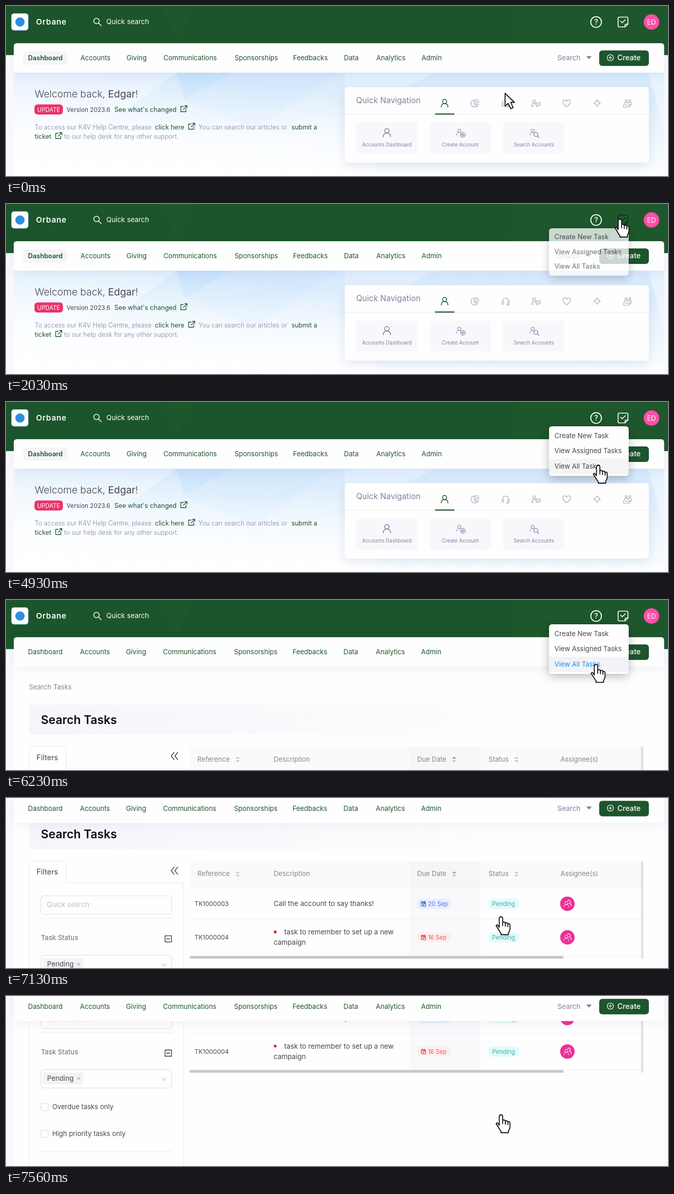
These frames come from a looping animation (1280 px wide and 329 px high, 8000 ms). An HTML page:

```html
<!DOCTYPE html>
<html lang="en">
<head>
<meta charset="utf-8">
<title>Tasks menu</title>
<style>
html, body { margin: 0; height: 100%; overflow: hidden; background: #f8f8fd; }
svg { display: block; width: 100vw; height: 100vh; }
text { font-family: Inter, "Open Sans", sans-serif; font-size: 13px; white-space: pre; }
.line { fill: none; stroke-linecap: round; stroke-linejoin: round; }
.green { fill: #1d552d; }
.grey { fill: #83829f; }
.ash { fill: #85858e; }
.dark { fill: #464650; }
.light { font-weight: 300; }
.mid { text-anchor: middle; }
.help text { font-size: 12.4px; }
.card { filter: drop-shadow(0 6px 10px #4a6aa028); }
.bar { filter: drop-shadow(0 5px 9px #5a5aa014); }
.pop { filter: drop-shadow(0 5px 9px #0004); }
.pill { font-size: 11.6px; font-weight: 300; }
</style>
</head>
<body>
<svg viewBox="0 0 1280 329" preserveAspectRatio="none">
<defs>
  <linearGradient id="sky" x1="0" y1="0" x2="0" y2="1">
    <stop offset="0" stop-color="#d3e8fc"/><stop offset=".45" stop-color="#e6f2fd"/><stop offset="1" stop-color="#fdfeff"/>
  </linearGradient>
  <linearGradient id="haze" x1="0" y1="1" x2=".3" y2="0">
    <stop offset="0" stop-color="#fff"/><stop offset=".4" stop-color="#fff" stop-opacity=".75"/><stop offset="1" stop-color="#fff" stop-opacity="0"/>
  </linearGradient>
  <linearGradient id="band"><stop offset="0" stop-color="#f6f5fb"/><stop offset="1" stop-color="#fefefe"/></linearGradient>
  <linearGradient id="edge"><stop offset="0" stop-color="#000" stop-opacity="0"/><stop offset="1" stop-color="#000" stop-opacity=".16"/></linearGradient>
  <g id="person"><circle cy="-3.2" r="4"/><path d="M-6.5 7.5C-6.5 3-4 .8 0 .8S6.5 3 6.5 7.5"/></g>
  <g id="pie"><path d="M-1.5-6.5a7 7 0 1 0 7.500 8h-7.500zM1.500-7.500a6.500 6.500 0 0 1 6 6h-6zM-1.500 1.500L4 6"/></g>
  <g id="headset"><path d="M-6 1v-1a6 6 0 0 1 12 0v1M-7 1h3v5h-3zM4 1h3v5h-3zM6 6q0 2-5 2"/></g>
  <g id="talk"><circle cx="-4" cy="-4" r="2.500"/><path d="M-8 7v-4q0-3 4-3 3 0 4 3M-6 7v-3M0-1h8v6h-4l-2 2v-2h-2zM2 2h4"/></g>
  <g id="heart"><path d="M0 7C-10 0-8.500-6.500-4-6.500Q-1-6.500 0-3.500 1-6.500 4-6.500C8.500-6.500 10 0 0 7z"/></g>
  <g id="aim"><circle r="4.500"/><path d="M0-7v4M0 7v-4M-7 0h4M7 0h-4"/></g>
  <g id="care"><circle cx="-3" cy="-5" r="2"/><circle cx="4" cy="-5" r="2"/><path d="M-6 1q0-3 3-3t3 3q0-3 4-3 3 0 3 3M-8 3h3q2 0 3 1.500h3l5-2.500q2 0 0 2L2 8h-10z"/></g>
  <g id="out"><path d="M-1-4.500h-5v10h10v-5M1.500-6h4.500v4.500M6-6L-1 1"/></g>
  <g id="plus"><circle r="6"/><path d="M-3 0h6M0-3v6"/></g>
  <g id="sort"><path d="M-4-1.500l4-4 4 4z"/><path d="M-4 1.500l4 4 4-4z" fill="#c8c8cc"/></g>
  <g id="date"><path d="M-4 4v-7.500h8v3M-4-1.500h8M-2-5v2M2-5v2M-4 4h3"/><circle cx="2" cy="2.500" r="2.500"/></g>
</defs>

<rect width="1280" height="329" fill="#f8f8fd"/>
<rect x="15" width="1257.500" height="329" fill="#fefefe"/>

<g id="home">
  <rect x="15" y="120" width="1257.500" height="209" fill="url(#sky)"/>
  <path d="M15 129H330L235 200 15 290z" fill="#fff" opacity=".3"/>
  <path d="M330 129h105l-90 52z" fill="#b5dafa" opacity=".42"/>
  <path d="M435 129L345 181 480 240 640 129z" fill="#c8e2fb" opacity=".3"/>
  <path d="M830 129l-175 90V129z" fill="#fff" opacity=".25"/>
  <path d="M1272 129v110l-30-110z" fill="#fff" opacity=".35"/>
  <rect x="15" y="129" width="700" height="200" fill="url(#haze)"/>
  <text x="55.500" y="176.500" class="light dark" style="font-size:19.100px">Welcome back, <tspan font-weight="400">Edgar</tspan>!</text>
  <rect x="55" y="190.500" width="55" height="19.500" rx="6" fill="#ea3369"/>
  <text x="82.500" y="204.500" class="mid" fill="#fff" style="font-size:11.200px">UPDATE</text>
  <text x="117" y="204.500" class="dark" style="font-size:11.800px">Version 2023.6</text>
  <text x="209.500" y="204.500" class="green" style="font-size:12.500px">See what's changed</text>
  <g class="help light">
    <text x="55.500" y="238.500" class="grey">To access our K4V Help Centre, please</text>
    <text x="288" y="238.500" class="green" font-weight="400">click here</text>
    <text x="365" y="238.500" class="grey">. You can search our articles or</text>
    <text x="552" y="238.500" class="green" font-weight="400">submit a</text>
    <text x="55.500" y="257" class="green" font-weight="400">ticket</text>
    <text x="112.500" y="257" class="grey">to our help desk for any other support.</text>
  </g>
  <g class="line" stroke="#1d552d" stroke-width="1.300">
    <use href="#out" x="344" y="199"/><use href="#out" x="359" y="233"/><use href="#out" x="102" y="251"/>
  </g>
  <rect x="655" y="157" width="588" height="146" rx="6" fill="#fefefe" class="card"/>
  <path d="M655 209.500h588" stroke="#efeff4"/>
  <text x="677" y="188" class="grey" style="font-size:15.500px">Quick Navigation</text>
  <rect x="829.500" y="208" width="37.500" height="2.200" fill="#1d552d"/>
  <g id="icons" class="line" stroke="#a9a8c0" stroke-width="1.200"></g>
  <g id="tiles"></g>
</g>

<g id="tasks">
  <text x="44.500" y="172.500" class="grey">Search Tasks</text>
  <rect x="44" y="202.500" width="1000" height="58" rx="6" fill="url(#band)"/>
  <text x="67.500" y="239.500" fill="#0c0c0c" font-weight="600" style="font-size:22.700px">Search Tasks</text>
  <g class="line" stroke="#e8e8ef">
    <path d="M44.500 680V289q0-5.500 5.500-5.500h60.500q5.500 0 5.500 5.500v36.500h222q5.500 0 5.500 5.500v350"/>
    <path d="M67 394.500h254M67 623.500h254"/>
    <rect x="67.500" y="350.500" width="253" height="36" rx="6" stroke="#dcdce0"/>
    <rect x="67.500" y="465.500" width="253" height="36" rx="6" stroke="#dcdce0"/>
    <rect x="67.500" y="531.500" width="14" height="14" rx="1.500" stroke="#dcdce0"/>
    <rect x="67.500" y="583" width="14" height="14" rx="1.500" stroke="#dcdce0"/>
    <path d="M301 482l4 5 4-5" stroke="#aaa"/>
    <path d="M325 295l-5.500 7 5.500 7M332 295l-5.500 7 5.500 7" stroke="#333" stroke-width="1.400"/>
    <path d="M307.500 428h12.500v12h-12.500zM310.500 434h6.500" stroke="#333" stroke-width="1.300"/>
  </g>
  <text x="59" y="309.500" class="dark" style="font-size:14.400px">Filters</text>
  <text x="78.500" y="372.500" fill="#c0c0c4" style="font-size:13.300px">Quick search</text>
  <text x="67.500" y="436.500" fill="#7b7b90" font-weight="500">Task Status</text>
  <rect x="71" y="471.500" width="78.500" height="23" rx="2" fill="#f3f3f4"/>
  <text x="79.500" y="487.500" class="dark" style="font-size:13.300px">Pending</text>
  <path d="M137.500 480.500l5.500 5.500m0-5.500l-5.500 5.500" stroke="#888"/>
  <text x="89.500" y="542.500" class="dark">Overdue tasks only</text>
  <text x="89.500" y="594.500" class="dark">High priority tasks only</text>

  <rect x="355" y="283.500" width="877" height="50.500" fill="#fafafb"/>
  <rect x="780" y="283.500" width="138" height="50.500" fill="#f6f6f7"/>
  <rect x="780" y="334" width="138" height="133" fill="#f9f9fb"/>
  <path d="M355 333.500h877M355 395.500h877M355 466.500h877" stroke="#f0f0f3"/>
  <g id="heads"></g>
  <g fill="#c8c8cc">
    <use href="#sort" x="448" y="308.500"/><use href="#sort" x="987" y="308.500"/>
    <use href="#sort" x="866.500" y="308.500" fill="#5aa9f0"/>
  </g>
  <g id="rows"></g>
  <text x="517.500" y="370" class="dark" style="font-size:13.400px">Call the account to say thanks!</text>
  <circle cx="520.500" cy="420.500" r="2.800" fill="#f5222d"/>
  <text x="538" y="425.500" class="dark" style="font-size:13.400px">task to remember to set up a new</text>
  <text x="517.500" y="445.500" class="dark" style="font-size:13.400px">campaign</text>
  <rect x="355" y="467" width="723" height="5" rx="2.500" fill="#c6c6c8"/>
  <rect x="1226" y="283.500" width="6" height="188.500" fill="url(#edge)"/>
</g>

<g id="head">
  <rect width="1280" height="95" fill="#1c552b"/>
  <path d="M300 0h65l-35 65z" fill="#fff" opacity=".01"/>
  <path d="M980 0l-6 95h306V0z" fill="#fff" opacity=".01"/>
  <rect x="10.500" y="14.500" width="32.500" height="32.500" rx="5" fill="#fff" stroke="#8cc4ee"/>
  <circle cx="27" cy="31" r="9" fill="#2a8fe0"/>
  <text x="58" y="36" fill="#fff" font-weight="600" letter-spacing=".8" style="font-size:15.200px">Orbane</text>
  <g class="line" stroke="#fff" stroke-width="1.500">
    <circle cx="175" cy="29" r="5.300"/><path d="M179 33l5 5"/>
    <circle cx="1141" cy="31" r="10.300" stroke-width="1.800"/>
    <path id="note" stroke-width="1.700" d="M1197 40.500h-11q-2.500 0-2.500-2.500v-14q0-2.500 2.500-2.500h14q2.500 0 2.500 2.500v11zv-3.500q0-2 2-2h3.500M1188.500 29.500l3 3 6-6"/>
  </g>
  <text x="194" y="35" fill="#fff" style="font-size:13.300px">Quick search</text>
  <text x="1141" y="36.200" class="mid" fill="#fff" font-weight="500" style="font-size:14.500px">?</text>
  <circle cx="1248" cy="31" r="15" fill="#ff4fa9"/>
  <text x="1248" y="35.700" class="mid" fill="#fff">ED</text>
</g>

<g id="nav">
  <path d="M15 129V78q0-6 6-6h1245.500q6 0 6 6v51z" fill="#fefefe" class="bar"/>
  <g id="active">
    <rect x="33" y="88" width="86" height="25.500" rx="6" fill="#f5f5f8"/>
    <text x="42.500" y="105" class="green" font-weight="600" style="font-size:12.700px">Dashboard</text>
  </g>
  <text id="idle" x="42.500" y="105" class="green">Dashboard</text>
  <g id="tabs" class="green"></g>
  <text x="1066" y="105" class="grey" style="font-size:13.500px">Search</text>
  <path d="M1122 97h10.500l-5.250 6z" class="grey"/>
  <rect x="1147" y="86" width="96" height="30" rx="6" class="green"/>
  <use href="#plus" x="1168.500" y="100" class="line" stroke="#fff" stroke-width="1.200"/>
  <text x="1182" y="105.300" fill="#fff" font-weight="500" style="font-size:14.200px">Create</text>
</g>

<g id="menu">
  <rect x="1050" y="47" width="154" height="96" rx="5.500" fill="#fefefe" class="pop"/>
  <rect id="hover" x="1050" width="154" height="29.500"/>
  <text x="1060.500" y="69.500" class="dark">Create New Task</text>
  <text x="1060.500" y="99" class="dark">View Assigned Tasks</text>
  <text id="all" x="1060.500" y="128.500">View All Tasks</text>
</g>

<g id="cursor" class="line" stroke="#111" stroke-width="1.800" style="fill:#fff">
  <path id="arrow" d="M1 1V26L7 20.500 12 31 16.500 28.500 12 18.500H19z"/>
  <path id="hand" d="M-3.300 21V4Q-3.300 1 0 1T3.300 4V12.500Q3.800 10.500 6 10.800 8.300 11 8.500 14 9 12 11 12.300 13.200 12.600 13.400 15.500 14 14 15.500 14.200 17.500 14.600 17.500 18V24Q17.300 28 14.500 32V35.500H0V32.500Q-3 29-5 25T-9 19Q-9.500 16.500-7.500 16.600-5.500 17-3.300 21zM3.300 12.500V18M8.500 14V19M13.400 15.500V20"/>
</g>
</svg>

<script>
const LOOP = 8000, SCROLL = 323.5, STICK = 80.5, OPEN = 2030, SWITCH = 6200;
const $ = id => document.getElementById(id);
const show = (id, on) => $(id).style.display = on ? '' : 'none';
const shift = (id, x, y) => $(id).setAttribute('transform', `translate(${x} ${y})`);
const text = (x, y, s, more = '') => `<text x="${x}" y="${y}" ${more}>${s}</text>`;
const icon = (id, x, y, more = '') => `<use href="#${id}" x="${x}" y="${y}" ${more}/>`;

$('icons').innerHTML = ['person', 'pie', 'headset', 'talk', 'heart', 'aim', 'care']
  .map((id, i) => icon(id, 848 + 59 * i, 188, i ? '' : 'stroke="#1d552d" stroke-width="1.5"')).join('');

const badges = ['', '<circle cx="5" cy="4.500" r="4.500" fill="#f8f8fc"/><path d="M2.500 4.500h5M5 2v5"/>',
  '<circle cx="4" cy="3.500" r="4" fill="#f8f8fc"/><path d="M7 6.500l3 3"/>'];
$('tiles').innerHTML = ['Accounts Dashboard', 'Create Account', 'Search Accounts'].map((s, i) => {
  const x = 677 + 142 * i, mid = x + 59.5;
  const scale = i ? .8 : 1.1;
  return `<rect x="${x}" y="226" width="119" height="59" rx="3" fill="#f8f8fc"/>
    <g class="line" stroke="#77769a" stroke-width="1.2" transform="translate(${mid} 245)">
      <g transform="translate(${i ? -2 : 0} ${i ? -1 : 0}) scale(${scale})">${icon('person', 0, 0)}</g>${badges[i]}</g>` +
    text(mid, 271.5, s, 'class="grey mid" style="font-size:9.700px"');
}).join('');

$('tabs').innerHTML = [['Accounts', 144], ['Giving', 233], ['Communications', 304.5], ['Sponsorships', 442],
  ['Feedbacks', 555], ['Data', 653.5], ['Analytics', 716], ['Admin', 803.5]]
  .map(([s, x]) => text(x, 105, s)).join('');

$('heads').innerHTML = [['Reference', 370], ['Description', 517.5], ['Due Date', 795], ['Status', 933], ['Assignee(s)', 1072]]
  .map(([s, x]) => text(x, 312.5, s, 'class="ash"')).join('');

$('rows').innerHTML = [['TK1000003', '20 Sep', '#2f54d8', '#e8effe', 366], ['TK1000004', '16 Sep', '#e0302f', '#fdefee', 431]]
  .map(([ref, due, ink, tint, y]) => text(364.5, y + 4, ref, 'class="dark" style="font-size:12px"') +
    `<rect x="795" y="${y - 10}" width="65" height="20" rx="6" fill="${tint}"/>
     <rect x="933" y="${y - 10}" width="59" height="20" rx="6" fill="#e1fbfa"/>
     <circle cx="1085.500" cy="${y}" r="14" fill="#ee2f98"/>
     <g class="line" stroke="#fff" stroke-width="1.200">
       <g transform="translate(1083.500 ${y + 1}) scale(.75)">${icon('person', 0, 0)}</g>
       <path d="M1086 ${y - 6}a3 3 0 1 1 3 5q4 1 4 5"/></g>` +
    icon('date', 807, y, `class="line" stroke="${ink}" stroke-width="1.1"`) +
    text(816, y + 4, due, `class="pill" fill="${ink}"`) +
    text(940, y + 4, 'Pending', 'class="pill" fill="#23918f"')).join('');

const clamp = v => Math.min(1, Math.max(0, v));
const smooth = v => v * v * (3 - 2 * v);

// cubic-bezier(.25, .1, .18, 1)
function glide(x) {
  const curve = (a, b, u) => 3 * u * (1 - u) ** 2 * a + 3 * u * u * (1 - u) * b + u ** 3;
  let lo = 0, hi = 1;
  for (let i = 0; i < 24; i++) {
    const u = (lo + hi) / 2;
    if (curve(.25, .18, u) < x) lo = u; else hi = u;
  }
  return curve(.1, 1, lo);
}

// time, x, y of the pointer tip
const path = [[0, 964, 168], [260, 964, 168], [1060, 1187, 26], [1100, 1187, 26], [1230, 1187, 28.5], [2530, 1187, 28.5],
  [3200, 1143, 89], [4330, 1143, 89], [4930, 1145, 121.5], [6160, 1145, 121.5], [6960, 957, 229], [LOOP, 957, 229]];

function pointer(t) {
  const i = path.findIndex(p => p[0] > t);
  const [t0, x0, y0] = path[i - 1], [t1, x1, y1] = path[i];
  const k = smooth((t - t0) / (t1 - t0));
  return [x0 + (x1 - x0) * k, y0 + (y1 - y0) * k];
}

function draw(t) {
  const [x, y] = pointer(t);
  const hand = t >= 1000, done = t >= SWITCH;
  shift('cursor', x, y);
  show('hand', hand);
  show('arrow', !hand);
  $('note').setAttribute('stroke', hand && y < 46 ? '#0d2f17' : '#fff');

  show('home', !done);
  show('active', !done);
  show('tasks', done);
  show('idle', done);
  shift('tabs', done ? -1 : 0, 0);

  const scroll = SCROLL * glide(clamp((t - 6974) / 586));
  shift('head', 0, -scroll);
  shift('tasks', 0, -scroll);
  shift('nav', 0, -Math.min(scroll, STICK));

  const open = 1 - .23 * (1 - clamp((t - OPEN) / 170)) ** 3;
  show('menu', t >= OPEN);
  $('menu').setAttribute('opacity', open);
  $('menu').setAttribute('transform', `translate(0 ${47 - scroll}) scale(1 ${.8 + .2 * open}) translate(0 -47)`);

  const item = t >= 6160 ? 2 : Math.floor((y - 51) / 29.5);
  show('hover', item >= 0);
  $('hover').setAttribute('y', 51 + 29.5 * item);
  $('hover').setAttribute('fill', done ? '#f1f3f6' : '#f4f4f5');
  $('all').setAttribute('fill', done ? '#1890f0' : '#464650');
}

function tick() {
  draw(performance.now() % LOOP);
  requestAnimationFrame(tick);
}
tick();
</script>
</body>
</html>
```
